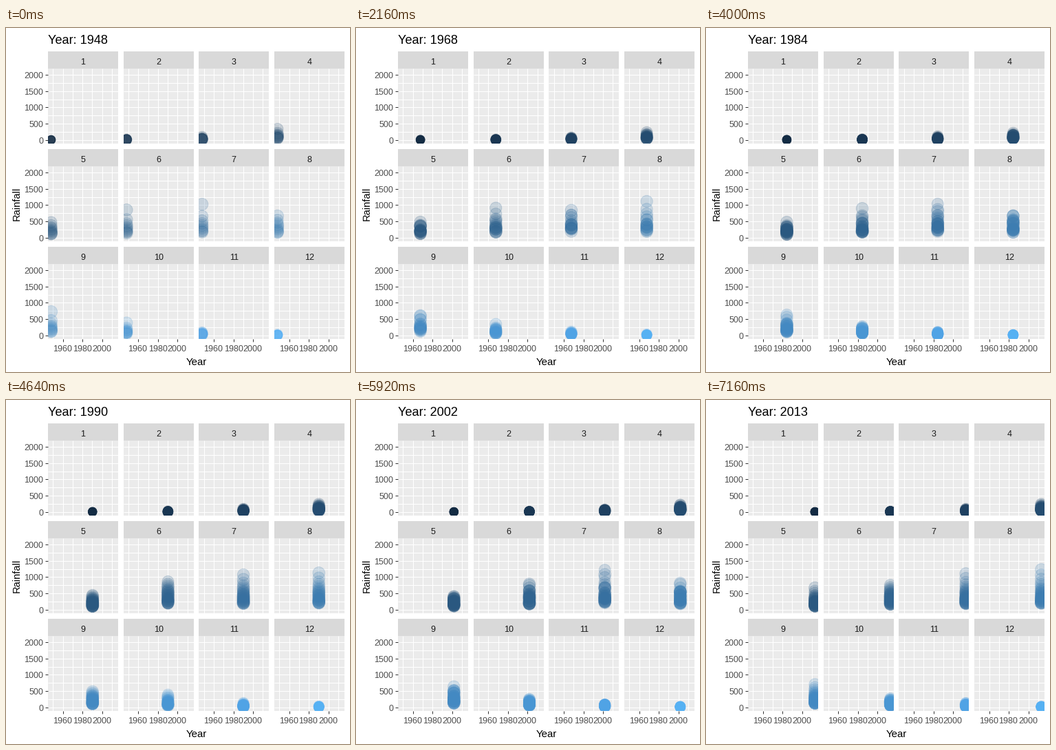
A matplotlib script for the animation above (8000 ms loop, 500 by 500 pixels).

```python
import numpy as np
import matplotlib.pyplot as plt
from matplotlib.animation import FuncAnimation
from matplotlib.patches import Rectangle

SIZE, DPI = 500, 100
PX = 72 / DPI                      # points per pixel
FRAMES, LAST, INTERVAL = 200, 179, 40
FIRST_YEAR, SPAN, STATIONS = 1948, 65, 35

LEFT, TOP = 61, 59                 # corner of the first panel
PANEL_W, PANEL_H, STRIP_H = 102, 109, 25
STEP_X, STEP_Y = 109.67, 142
Y_MAX = 2086

rng = np.random.default_rng(12)
wetness = rng.uniform(0, 1, STATIONS)


def season(month):
    """Typical upper rainfall of a month, a bell around the monsoon."""
    return 15 + 800 * np.exp(-((month - 6.1) / 2.6) ** 2)


def station_count(year):
    return min(STATIONS, 10 + (year - FIRST_YEAR) // 2)


def month_rain(month, n):
    """Rainfall of n stations; wet stations tend to stay wet."""
    high = season(month) * rng.uniform(0.85, 1.15)
    tail = rng.uniform(0.1, 0.7)
    u = np.linspace(0, 1, n)
    rain = high * (0.25 + 0.65 * u ** 1.4 + tail * u ** 12)
    order = np.argsort(np.argsort(wetness[:n] + rng.normal(0, 0.25, n)))
    return rain[order]


def month_size(month, n):
    """Dot diameters in pixels, smaller in the cool months."""
    mean = 17.6 - 5.6 * abs(month / 6 - 1) ** 3
    return np.clip(mean + rng.normal(0, 0.5, n), 8, 18)


years = np.arange(FIRST_YEAR, FIRST_YEAR + SPAN + 1)
knots = np.round((years - FIRST_YEAR) * LAST / SPAN).astype(int)
counts = [station_count(y) for y in years]
rain = [[month_rain(m, n) for m in range(12)] for n in counts]
sizes = [[month_size(m, n) for m in range(12)] for n in counts]


def month_color(month):
    t = month / 11
    dark, light = np.array([19, 43, 67]), np.array([86, 177, 247])
    rgb = dark + (light - dark) * t - t * (1 - t) * np.array([4, 16, 20])
    return (*(rgb / 255), 0.2)


def x_pos(year):
    return PANEL_W * (0.05 + (year - FIRST_YEAR) / SPAN) / 1.1


def y_pos(value):
    return PANEL_H * (1 - (0.05 + value / Y_MAX) / 1.1)


def snap(v):
    """Centre of the pixel that a thin line falls on."""
    return np.floor(v - 0.6) + 0.5


plt.rcParams["font.family"] = "Liberation Sans"
fig = plt.figure(figsize=(SIZE / DPI, SIZE / DPI), dpi=DPI, facecolor="white")
ax = fig.add_axes([0, 0, 1, 1])
ax.set_xlim(0, SIZE)
ax.set_ylim(SIZE, 0)
ax.axis("off")


def label(x, y, text, px, color="black", ha="center", va="baseline", **kw):
    return ax.text(x, y, text, fontsize=px * PX, color=color, ha=ha, va=va, **kw)


def line(xs, ys, color):
    ax.plot(xs, ys, color=color, lw=PX, solid_capstyle="butt", zorder=2)


def box(x, y, w, h, color):
    x0, y0, x1, y1 = np.round([x, y, x + w, y + h])
    return ax.add_patch(Rectangle((x0, y0), x1 - x0, y1 - y0, fc=color,
                                  lw=0, zorder=1))


def draw_panel(month):
    row, col = divmod(month, 4)
    x, y = LEFT + col * STEP_X, TOP + row * STEP_Y
    x0, x1 = round(x), round(x + PANEL_W)
    box(x, y - STRIP_H, PANEL_W, STRIP_H, "#D9D9D9")
    panel = box(x, y, PANEL_W, PANEL_H, "#EBEBEB")
    label(x + PANEL_W / 2, y - 6, str(month + 1), 12.5, "#1A1A1A")

    for value in range(0, 2001, 250):
        gy = snap(y + y_pos(value))
        line([x0, x1], [gy, gy], "white")
        if col == 0 and value % 500 == 0:
            line([x0 - 4, x0], [gy, gy], "#333333")
            label(54.3, gy + 5.2, str(value), 12.5, "#4D4D4D", "right")
    for year in range(1950, 2011, 10):
        gx = snap(x + x_pos(year))
        line([gx, gx], [y, y + PANEL_H], "white")
        if row == 2 and year in (1960, 1980, 2000):
            line([gx, gx], [y + PANEL_H, y + PANEL_H + 4], "#333333")
            label(gx, 470, str(year), 12.5, "#4D4D4D")

    color = month_color(month)
    dots = ax.scatter([], [], facecolors=[color], edgecolors=[color],
                      linewidths=0.94 * PX, zorder=3)
    dots.set_clip_path(panel)
    return x, y, dots


panels = [draw_panel(m) for m in range(12)]
title = label(61, 23, "", 18.2, ha="left")
label(LEFT + 215.8, 490, "Year", 15)
label(23, 255.5, "Rainfall", 14.67, ha="right", va="center", rotation=90)


def blend(data, i, month, t):
    a = data[i][month]
    if t == 0:
        return a
    b = data[i + 1][month]
    n = min(len(a), len(b))
    return a[:n] * (1 - t) + b[:n] * t


def update(frame):
    step = min(frame, LAST)
    i = np.searchsorted(knots, step, side="right") - 1
    t = 0 if step == knots[i] else (step - knots[i]) / (knots[i + 1] - knots[i])
    year = FIRST_YEAR + SPAN * step / LAST
    title.set_text(f"Year: {round(year)}")
    for month, (x, y, dots) in enumerate(panels):
        values = blend(rain, i, month, t)
        xs = np.full(len(values), x + x_pos(year))
        dots.set_offsets(np.column_stack([xs, y + y_pos(values)]))
        dots.set_sizes((blend(sizes, i, month, t) * PX) ** 2)
    return [title] + [dots for *_, dots in panels]


anim = FuncAnimation(fig, update, frames=FRAMES, interval=INTERVAL,
                     repeat=True, repeat_delay=0, blit=False)
plt.show()
```
